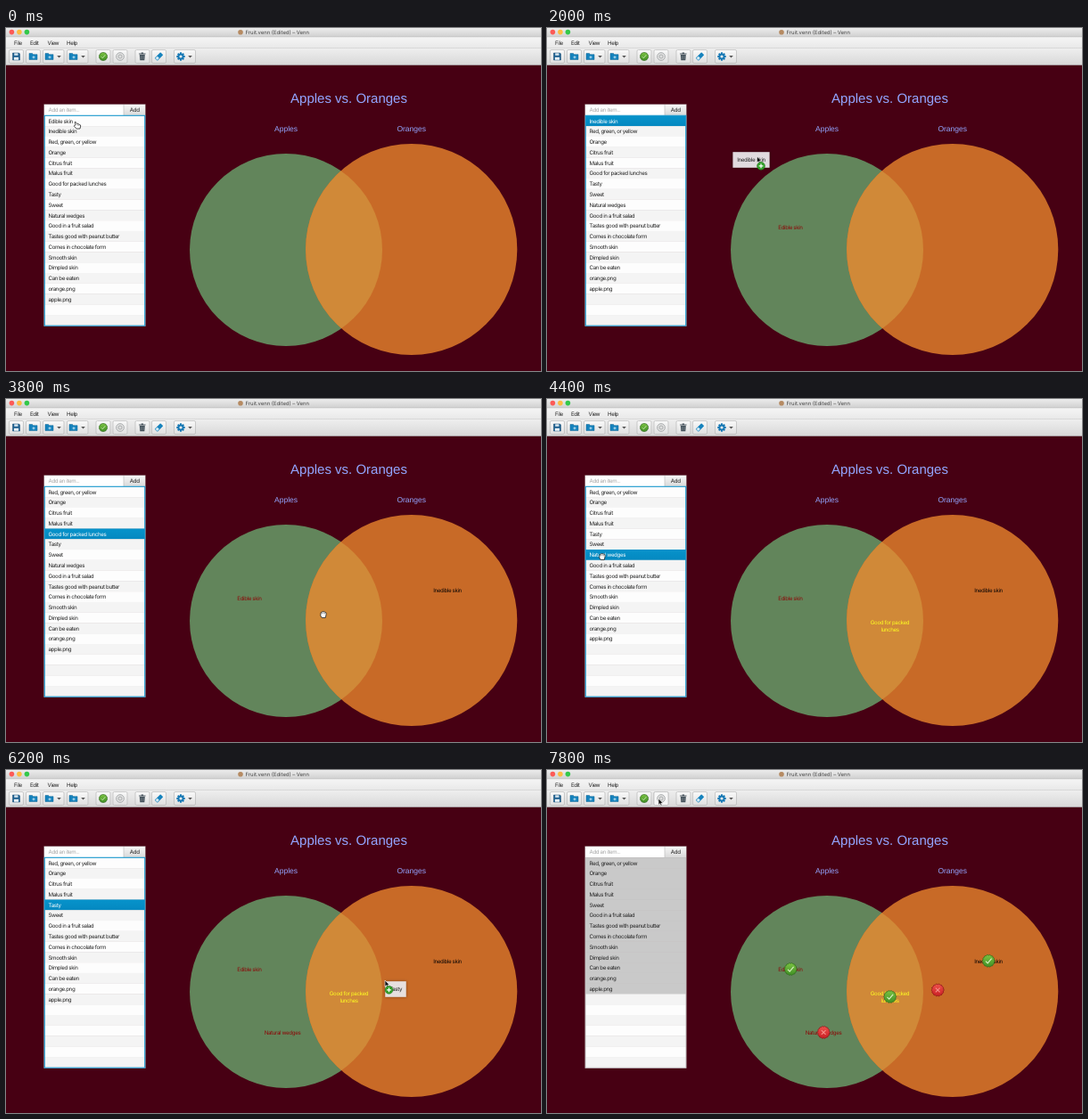
An HTML page with a canvas that plays this animation: 600 px wide and 385 px high, repeating every 8 s.

```html
<!DOCTYPE html>
<html lang="en">
<head>
<meta charset="utf-8">
<title>Venn diagram sorting</title>
<style>
html, body { margin: 0; width: 100%; height: 100%; overflow: hidden; background: #470013; }
canvas { display: block; width: 600px; height: 385px; }
</style>
</head>
<body>
<canvas id="stage"></canvas>
<script>
const canvas = document.getElementById('stage');
const ctx = canvas.getContext('2d');
const ratio = window.devicePixelRatio || 1;
canvas.width = 600 * ratio;
canvas.height = 385 * ratio;

const LOOP = 8000, STEP = 200, CHECK_TIME = 7400;
const UI = 'Inter, "Open Sans", sans-serif';
const ARIAL = '"Liberation Sans", Arial, sans-serif';
const LIST = { x: 43, y: 98.4, w: 113, h: 236, row: 11.77 };
const APPLES = { x: 314, y: 249, r: 108 };
const ORANGES = { x: 454.7, y: 248.5, r: 118.6 };

const ITEMS = ['Edible skin', 'Inedible skin', 'Red, green, or yellow', 'Orange', 'Citrus fruit',
  'Malus fruit', 'Good for packed lunches', 'Tasty', 'Sweet', 'Natural wedges',
  'Good in a fruit salad', 'Tastes good with peanut butter', 'Comes in chocolate form',
  'Smooth skin', 'Dimpled skin', 'Can be eaten', 'orange.png', 'apple.png'];

// x, y: resting place of the label; dx, dy: label centre relative to the pointer
const DRAGS = [
  { item: 'Edible skin', focus: 0, press: 200, lift: 400, release: 800, place: 1000,
    x: 273, y: 223.5, dx: 5, dy: 4, color: '#8c0808', right: true },
  { item: 'Inedible skin', focus: 1400, press: 1400, lift: 1600, release: 2400, place: 2600,
    x: 495, y: 214.3, dx: -6.5, dy: 4, color: '#080404', right: true },
  { item: 'Good for packed lunches', lines: ['Good for packed', 'lunches'], focus: 3200, press: 3200,
    lift: 3400, release: 3800, place: 4000, x: 384.5, y: 254.5, dx: 28, dy: 12, color: '#ffff22', right: true },
  { item: 'Natural wedges', focus: 4400, press: 4400, lift: 4600, release: 4800, place: 5000,
    x: 310, y: 294.5, dx: 25, dy: 7, color: '#8c0808', right: false },
  { item: 'Tasty', focus: 5600, press: 5600, lift: 5800, release: 6400, place: 6600,
    x: 438, y: 247, dx: 12, dy: 10, color: '#080404', right: false }
];

const POINTER = [[0, 80, 109], [200, 80, 109], [800, 268, 219], [1000, 266, 218], [1400, 82, 107],
  [1600, 100, 113], [2000, 235.5, 144], [2400, 501, 210], [2600, 500, 210], [3000, 62, 154],
  [3200, 62, 154], [3400, 130, 178], [3800, 356, 242], [4000, 354, 241], [4400, 62, 177],
  [4600, 170, 232], [4800, 284.5, 284], [5000, 284.5, 284], [5400, 64, 154], [5600, 64, 154],
  [5800, 150, 172], [6200, 425, 236], [6400, 426, 237], [6600, 424, 234], [7200, 109, 34],
  [7400, 109, 34], [7800, 125, 32], [8000, 125, 32]];

function pointerAt(t) {
  const i = POINTER.findIndex(p => p[0] > t);
  const [t0, x0, y0] = POINTER[i - 1], [t1, x1, y1] = POINTER[i];
  const u = (t - t0) / (t1 - t0), k = u * u * (3 - 2 * u);
  return { x: x0 + (x1 - x0) * k, y: y0 + (y1 - y0) * k };
}

function rect(x, y, w, h, fill) {
  ctx.fillStyle = fill;
  ctx.fillRect(x, y, w, h);
}

function shape(path, fill, stroke, width = 0.7) {
  if (fill) { ctx.fillStyle = fill; ctx.fill(path); }
  if (stroke) { ctx.strokeStyle = stroke; ctx.lineWidth = width; ctx.stroke(path); }
}

function circle(x, y, r, fill, stroke, width) {
  const p = new Path2D();
  p.arc(x, y, r, 0, Math.PI * 2);
  shape(p, fill, stroke, width);
  return p;
}

function box(x, y, w, h, r, fill, stroke) {
  const p = new Path2D();
  p.roundRect(x, y, w, h, r);
  shape(p, fill, stroke);
}

function vertical(y0, y1, from, to) {
  const g = ctx.createLinearGradient(0, y0, 0, y1);
  g.addColorStop(0, from);
  g.addColorStop(1, to);
  return g;
}

function text(str, x, y, color, { font = UI, size = 6.2, align = 'left', spacing = -0.38 } = {}) {
  ctx.font = `${size}px ${font}`;
  ctx.letterSpacing = `${spacing}px`;
  ctx.textAlign = align;
  ctx.fillStyle = color;
  ctx.fillText(str, x, y);
}

function at(x, y, draw) {
  ctx.save();
  ctx.translate(x, y);
  draw();
  ctx.restore();
}

const draw = (d, fill, stroke, width) => shape(new Path2D(d), fill, stroke, width);

function seal(x, y, r, right) {
  const p = new Path2D(), bumps = 14;
  for (let i = 0; i <= bumps * 6; i++) {
    const a = i / (bumps * 6) * Math.PI * 2, q = r * (0.95 + 0.05 * Math.cos(a * bumps));
    p.lineTo(x + q * Math.cos(a), y + q * Math.sin(a));
  }
  shape(p, right ? vertical(y - r, y + r, '#7cc443', '#3f8f25') : vertical(y - r, y + r, '#f0524c', '#c81f24'),
    right ? '#2f6b1c' : '#8d1518', 0.8);
  at(x, y, () => {
    ctx.scale(r / 7, r / 7);
    if (right) draw('M-3.2 .3L-1 2.6L3.4-2.6', null, '#d5efc0', 1.2);
    else draw('M-2.4-2.4L2.4 2.4M2.4-2.4L-2.4 2.4', null, '#f58f88', 1.1);
  });
}

function folder(x) {
  at(x, 32, () => {
    draw('M-4.5-3.5H-1L0-2.3H4.5V3.5H-4.5Z', '#1683bd', '#0e6795', 0.5);
    draw('M-1 .8H2M.5-.7V2.3', null, '#d9f0fb', 0.8);
  });
}

function gear(x, y) {
  for (let i = 0; i < 8; i++) at(x, y, () => {
    ctx.rotate(i * Math.PI / 4);
    rect(-1, -4.7, 2, 2.4, '#1779b5');
  });
  circle(x, y, 2.6, null, '#1779b5', 2);
}

function chrome(t) {
  rect(0, 0, 600, 10, vertical(0, 10, '#ececec', '#d0d0d0'));
  ['#fc5b57', '#fdbc40', '#34c84a'].forEach((c, i) => circle(6.4 + i * 8.5, 4.6, 2.8, c));
  circle(263, 4.8, 2.8, '#b58a62');
  text('Fruit.venn (Edited) – Venn', 268.5, 6.8, '#444', { size: 5.9, spacing: 0 });
  rect(0, 10, 600, 13, vertical(10, 23, '#f5f5f5', '#e8e8e8'));
  rect(0, 9.7, 600, 0.5, '#b5b5b5');
  [['File', 9], ['Edit', 27], ['View', 46.5], ['Help', 68]].forEach(([s, x]) => text(s, x, 18.6, '#222'));
  rect(0, 22.6, 600, 19, vertical(23, 41, '#eeeeee', '#d9d9d9'));
  rect(0, 22.4, 600, 0.5, '#c4c4c4');
  rect(0, 41, 600, 0.6, '#aaa');

  [[3.5, 16], [22.5, 16], [41.5, 23.5], [68.5, 23.5], [101, 16], [120, 16], [145, 16], [163.5, 16], [188.5, 24]]
    .forEach(([x, w]) => box(x, 24.5, w, 15, 1.5, vertical(24, 40, '#fafafa', '#dedede'), '#b9b9b9'));
  if (t >= 7600) box(120, 24.5, 16, 15, 1.5, '#f7f7f7', '#b9b9b9');

  at(11.5, 32, () => {
    draw('M-4-4H3L4-3V4H-4Z', '#1c5f8f', '#174a70', 0.5);
    rect(-2.3, -3.7, 4.3, 2.5, '#d6e5ef');
    rect(-2.6, 0.8, 5.2, 3, '#e8f0f5');
  });
  [30.5, 48.5, 75.5].forEach(folder);
  [59.5, 86.5, 206.5].forEach(x => at(x, 32, () => draw('M-2.3-1H2.3L0 1.6Z', '#555')));
  seal(109, 32, 4.7, true);
  circle(128, 32, 4.4, '#dedede', '#a2a6a8', 0.8);
  circle(128, 32, 2, null, '#a2a6a8', 0.8);
  at(152.8, 32, () => {
    draw('M-3-2H3L2.5 4.2H-2.5Z', '#46535c');
    draw('M-3.7-3H3.7M-1.2-4H1.2', null, '#46535c', 1.1);
    draw('M-1.1-.8V3M1.1-.8V3', null, '#8e989e', 0.6);
  });
  at(171.5, 32, () => {
    ctx.rotate(-Math.PI / 4);
    box(-4.6, -2.2, 9.2, 4.4, 0.8, '#1683bd');
    rect(-4, -1.5, 3, 3, '#d6ebf5');
  });
  gear(196, 32);
}

function diagram() {
  const green = circle(APPLES.x, APPLES.y, APPLES.r, '#62855b');
  circle(ORANGES.x, ORANGES.y, ORANGES.r, '#c86a27');
  ctx.save();
  ctx.clip(green);
  circle(ORANGES.x, ORANGES.y, ORANGES.r, '#d08938');
  ctx.restore();
  const heading = { font: ARIAL, align: 'center', spacing: 0 };
  text('Apples vs. Oranges', 384.5, 84, '#93a5ff', { ...heading, size: 15 });
  text('Apples', 314, 115.5, '#93a5ff', { ...heading, size: 8.5 });
  text('Oranges', 454.7, 115.5, '#93a5ff', { ...heading, size: 8.5 });
}

function list(t) {
  const { x, y, w, h, row } = LIST;
  const active = DRAGS.find(d => t >= d.focus && t < d.place);
  const checked = t >= CHECK_TIME;
  const items = ITEMS.filter(s => !DRAGS.some(d => d.item === s && t >= d.place));

  rect(x - 0.5, 85.5, w + 1, 249.3, '#c0b8ba');
  rect(x, 86, 89, 12, '#fff');
  text('Add an item...', 47.5, 94.4, '#a5a5a5');
  rect(132, 86, 24, 12, vertical(86, 98, '#f6f6f6', '#dadada'));
  rect(131.7, 86, 0.6, 12, '#b5b5b5');
  text('Add', 144.2, 94.4, '#222', { align: 'center' });

  for (let i = 0; i < 20; i++) {
    const top = y + i * row, label = items[i];
    const selected = active && t >= active.press && label === active.item;
    const fill = selected ? vertical(top, top + row, '#0793cb', '#0488c0')
      : checked && label ? '#c9c9c9' : i % 2 ? '#f4f4f4' : '#fdfdfd';
    rect(x, top, w, row + 0.1, fill);
    if (label) text(label, 47.5, top + row / 2 + 2.3, selected ? '#fff' : '#222');
  }
  ctx.strokeStyle = active ? '#1b9ad0' : '#c4c4c4';
  ctx.lineWidth = active ? 1.1 : 0.6;
  ctx.strokeRect(x + 0.3, y - 0.1, w - 0.6, h - 0.1);
}

function labels(t) {
  for (const d of DRAGS.filter(d => t >= d.place)) {
    const lines = d.lines || [d.item];
    lines.forEach((s, i) =>
      text(s, d.x, d.y + 2.2 + (i - (lines.length - 1) / 2) * 8, d.color, { align: 'center' }));
    if (t >= CHECK_TIME) seal(d.x + 0.2, d.y, 7, d.right);
  }
}

function arrow(p) {
  at(p.x, p.y, () => draw('M0 0V7.2L1.7 5.7L2.8 8.2L4 7.7L2.9 5.3H5.1Z', '#111', '#fff', 0.6));
}

function hand(p, closed) {
  at(p.x, p.y, () => {
    if (closed) {
      draw('M-3-1Q-3.2-3-1.8-2.8Q-1-4.2 0-3Q1.2-4 1.8-2.7Q3.3-2.8 3.2-.8L2.3 3.5H-1.8L-3.3 1Z', '#fff', '#222', 0.8);
      draw('M-1.4-2.3V-.7M.2-2.5V-.7M1.7-2.2V-.6', null, '#444', 0.5);
    } else {
      draw('M-2.8-3.4Q-1.6-4-1.2-2.8L-.4-1.4Q.7-2 1-1.1Q2-1.5 2.4-.5Q3.8-.5 3.7 1L3 4H-.8L-3.7 1.2Q-3.4 0-2-.2Z',
        '#fff', '#222', 0.8);
      draw('M.2-.9V.7M1.7-.5V.8', null, '#444', 0.5);
    }
  });
}

function pointer(t) {
  const p = pointerAt(t);
  const drag = DRAGS.find(d => t >= d.lift && t < d.release);
  if (drag) {
    const cx = p.x + drag.dx, cy = p.y + drag.dy;
    ctx.font = `6.2px ${UI}`;
    ctx.letterSpacing = '-0.38px';
    const w = ctx.measureText(drag.item).width + 9.5;
    ctx.save();
    ctx.shadowColor = 'rgba(0,0,0,.35)';
    ctx.shadowBlur = 3 * ratio;
    rect(cx - w / 2, cy - 8.8, w, 17.6, 'rgba(238,236,238,.93)');
    ctx.restore();
    text(drag.item, cx, cy + 2.2, '#222', { align: 'center' });
    arrow(p);
    if (p.x > LIST.x + LIST.w) {
      circle(p.x + 4.5, p.y + 10.8, 4.4, '#35a02b', '#237a1d', 0.6);
      at(p.x + 4.5, p.y + 10.8, () => draw('M-2.4 0H2.4M0-2.4V2.4', null, '#fff', 1.2));
    }
    return;
  }
  const releasing = DRAGS.some(d => t >= d.release && t < d.place);
  const pressing = DRAGS.some(d => t >= d.press && t < d.lift);
  const overList = p.x > LIST.x && p.x < LIST.x + LIST.w && p.y > LIST.y && p.y < LIST.y + LIST.h;
  if (releasing || overList) hand(p, releasing || pressing);
  else arrow(p);
}

function render(now) {
  const t = Math.floor(now % LOOP / STEP) * STEP;
  ctx.setTransform(ratio, 0, 0, ratio, 0, 0);
  ctx.textRendering = 'geometricPrecision';
  rect(0, 0, 600, 385, '#470013');
  diagram();
  labels(t);
  list(t);
  chrome(t);
  pointer(t);
}

let start;
function tick(now) {
  start ??= now;
  render(now - start);
  requestAnimationFrame(tick);
}
requestAnimationFrame(tick);
</script>
</body>
</html>
```
